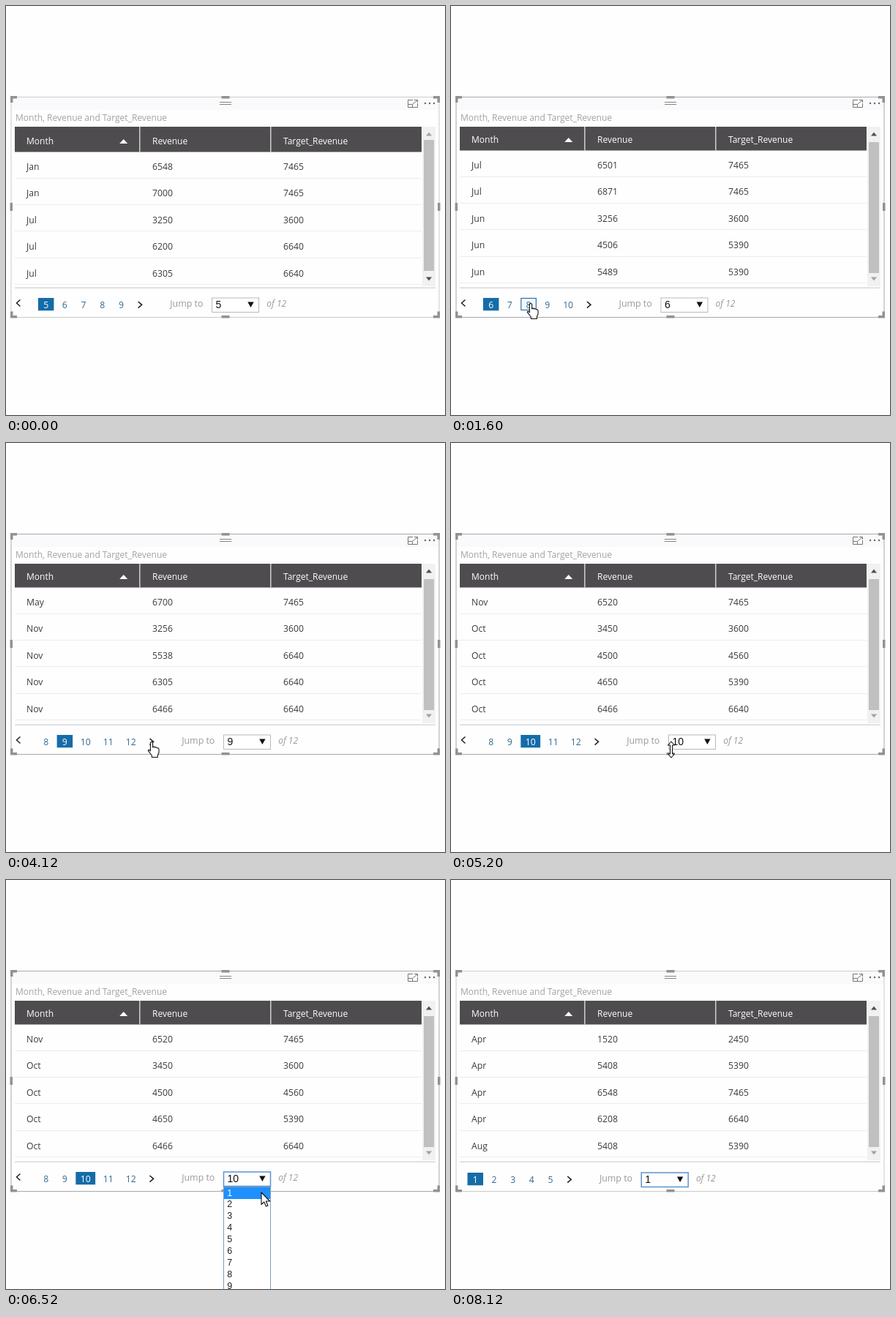
An HTML page that plays this animation: 600 px wide and 559 px high, repeating every 8.96 s.

```html
<!DOCTYPE html>
<html lang="en">
<head>
<meta charset="utf-8">
<title>Paged table</title>
<style>
html, body { margin: 0; width: 100%; height: 100%; overflow: hidden; background: #fefefe; }
svg { display: block; font-family: "Open Sans", "Noto Sans", sans-serif; }
.ui { font-family: "Liberation Sans", Arial, sans-serif; }
</style>
</head>
<body>
<svg id="stage" width="600" height="559" viewBox="0 0 600 559"></svg>
<script>
const LOOP = 8960, TICK = 40, STEP = 100;
const stage = document.getElementById('stage');

const pages = {
  5: ['Jan 6548 7465', 'Jan 7000 7465', 'Jul 3250 3600', 'Jul 6200 6640', 'Jul 6305 6640'],
  6: ['Jul 6501 7465', 'Jul 6871 7465', 'Jun 3256 3600', 'Jun 4506 5390', 'Jun 5489 5390'],
  9: ['May 6700 7465', 'Nov 3256 3600', 'Nov 5538 6640', 'Nov 6305 6640', 'Nov 6466 6640'],
  10: ['Nov 6520 7465', 'Oct 3450 3600', 'Oct 4500 4560', 'Oct 4650 5390', 'Oct 6466 6640'],
  1: ['Apr 1520 2450', 'Apr 5408 5390', 'Apr 6548 7465', 'Apr 6208 6640', 'Aug 5408 5390']
};
const clicks = [[0, 5], [1100, 6], [2900, 9], [4700, 10], [6800, 1]];

// pointer path: time, x, y
const path = [
  [100, 236, 416], [900, 185, 409], [1100, 185, 409], [1600, 109, 406], [2000, 132, 406],
  [2900, 132, 406], [3800, 197, 409], [4100, 199, 408], [4700, 199, 408], [5000, 265, 420],
  [5200, 301, 419], [5600, 349, 409], [5700, 349, 409], [6500, 349, 427], [7500, 349, 427],
  [7700, 346, 418], [8000, 340, 434], [8100, 340, 434]
];

const rect = (x, y, w, h, fill, more = '') =>
  `<rect x="${x}" y="${y}" width="${w}" height="${h}" fill="${fill}" ${more}/>`;
const line = (d, stroke, width = 1) =>
  `<path d="${d}" fill="none" stroke="${stroke}" stroke-width="${width}"/>`;
const shape = (d, fill, more = '') => `<path d="${d}" fill="${fill}" ${more}/>`;
const text = (x, y, str, fill, size = 12, more = '') =>
  `<text x="${x}" y="${y}" fill="${fill}" font-size="${size}" ${more}>${str}</text>`;

function pointerAt(t) {
  const i = path.findIndex(p => p[0] > t);
  if (i < 1) return null;
  const [t0, x0, y0] = path[i - 1], [t1, x1, y1] = path[i];
  const u = (t - t0) / (t1 - t0), e = u * u * (3 - 2 * u);
  return { x: x0 + (x1 - x0) * e, y: y0 + (y1 - y0) * e };
}

function drawFrame(active) {
  const grey = '#929292';
  const corner = (x, y, sx, sy) =>
    `<g transform="translate(${x} ${y}) scale(${sx} ${sy})">${shape('M0 0H9V3.5H3.5V9H0Z', grey)}</g>`;
  return rect(8, 126, 584, 16, '#faf9fb') +
    rect(7, 124.5, 585, 301, 'none', `stroke="${active ? '#a8a8a8' : '#cacaca'}"`) +
    corner(6, 123, 1, 1) + corner(593, 123, -1, 1) +
    corner(6, 426.5, 1, -1) + corner(593, 426.5, -1, -1) +
    rect(294.5, 123, 11, 3.5, grey) + rect(294.5, 423, 11, 3.5, grey) +
    rect(5.5, 269, 3.5, 11, grey) + rect(590, 269, 3.5, 11, grey) +
    line('M292 131.5H308M292 134.5H308', '#858585') +
    line('M556 128.5H549.5V138.5H562.5V133M558 128.5H562.5V132M562 129L556 134M549.5 134.5H555.5V138.5', '#777') +
    [573, 579, 585].map(x => `<circle cx="${x}" cy="133" r="1.2" fill="#666"/>`).join('') +
    text(13, 157, 'Month, Revenue and Target_Revenue', '#a3a2a3');
}

function drawTable(page) {
  const scroll = page === 5 ? 0 : 2;
  const cols = [28, 200, 379];
  let out = rect(12, 165, 556, 34.5 - scroll, '#4e4c4e') +
    line(`M182.8 165v${34.5 - scroll}M361.8 165v${34.5 - scroll}`, '#d8d8d8', 1.4) +
    ['Month', 'Revenue', 'Target_Revenue'].map((s, i) => text(cols[i], 188.5 - scroll, s, '#fff')).join('') +
    shape(`M160.7 ${182 - scroll}l5.5 6h-11Z`, '#fff');
  pages[page].forEach((row, r) => {
    const y = 219.5 - scroll + 36.4 * r;
    row.split(' ').forEach((s, i) => { out += text(cols[i], y + 4.5, s, '#3a3a3a', 12.2); });
    out += line(`M12 ${Math.round(y + 16) - .5}H568`, '#ececee');
  });
  const [up, down] = scroll ? ['#505050', '#a3a3a3'] : ['#a3a3a3', '#505050'];
  return out + rect(569, 165, 18, 218, '#f1f1f2') +
    rect(571, scroll ? 186 : 183, 14, 179, '#c1c0c1') +
    shape('M578 172.5l4 5h-8Z', up) + shape('M578 375.5l4-5h-8Z', down) +
    line('M12 385.3H587', '#d9d7dd', 1.4);
}

function pagerLayout(page) {
  const first = Math.min(page, 8), cells = [];
  let x = page === 1 ? 20.4 : 41.8;
  for (let n = first; n < first + 5; n++) {
    const w = n > 9 ? 31 : 25.7;
    cells.push({ n, cx: x + w / 2, w: w - 4.2 });
    x += w;
  }
  return { cells, end: x };
}

function drawPager(page, { cells, end }, focus, pointer) {
  const dy = page === 1 ? 1 : 0, sx = end + 111;
  let out = page > 1 ? line('M19.5 401.5L14.5 406L19.5 410.5', '#222', 1.5) : '';
  for (const { n, cx, w } of cells) {
    const on = n === page;
    const hover = !on && pointer && Math.abs(pointer.x - cx) < w / 2 && pointer.y < 417;
    if (on) out += rect(cx - w / 2, 399, w, 17.3, '#146ca8', `transform="translate(0 ${dy})"`);
    if (hover) out += rect(cx - w / 2 + .5, 399.5, w - 1, 16, '#f3f7fc', 'stroke="#2a74ad" stroke-width="1.2"');
    out += text(cx, 412.5 + dy, n, on ? '#fff' : '#33698f', 12.2, 'text-anchor="middle"');
  }
  return out +
    line(`M${end + 10.3} ${404 + dy}l5 4.3l-5 4.3`, '#222', 1.6) +
    text(end + 54, 411 + dy, 'Jump to', '#999', 12.4) +
    rect(sx + .3, 399 + dy, 64, 19.5, '#fff', focus ? 'stroke="#5a92d0" stroke-width="1.5"' : 'stroke="#b9b9b9"') +
    text(sx + 5.3, 413.2 + dy, page, '#111', 14, 'class="ui"') +
    shape(`M${sx + 49} ${404.5 + dy}h8.4l-4.2 7.5Z`, '#111') +
    text(end + 186, 411 + dy, 'of 12', '#999', 12, 'font-style="italic"');
}

function drawList(x, hover) {
  let out = rect(x + .3, 419.5, 64, 150, '#fff', 'stroke="#7f9db9"');
  if (hover) out += rect(x + .8, 420, 63, 16, '#1e90ff');
  for (let n = 1; n < 10; n++)
    out += text(x + 5, 431.5 + 15.9 * (n - 1), n, hover && n === 1 ? '#fff' : '#222', 12.5, 'class="ui"');
  return out;
}

function drawPointer({ x, y }, { cells, end }) {
  const buttons = [...cells, { cx: end + 13, w: 22 }];
  const overButton = y < 417 && buttons.some(b => Math.abs(x - b.cx) < b.w / 2 + 1);
  let d = 'M0 0V16.5L3.8 13L6.5 19L9 18L6.4 12H11.7Z';
  if (Math.abs(x - 301) < 7 && y > 416 && y < 428)
    d = 'M0-11L4.5-6H1.5V6H4.5L0 11L-4.5 6H-1.5V-6H-4.5Z';
  else if (overButton)
    d = 'M-1.6 1.7Q0-1 1.6 1.7V8Q3.2 6.2 4.6 8.2Q6.3 6.8 7.5 9Q9.6 8.2 10 10.5V15L8.3 18.8V21.5H.3V19L-4.6 12.7Q-4.6 10 -1.6 12.8Z';
  return `<g transform="translate(${x} ${y})">${shape(d, '#fff', 'stroke="#111" stroke-width="1.1" stroke-linejoin="round"')}</g>`;
}

function draw(ms) {
  const t = Math.floor(Math.floor(ms / TICK) * TICK / STEP) * STEP;
  const page = clicks.filter(c => c[0] <= t).pop()[1];
  const pointer = pointerAt(t), layout = pagerLayout(page);
  const open = t >= 5700 && t < 6800;
  stage.innerHTML =
    drawFrame(open || pointer && pointer.y < 426) +
    drawTable(page) +
    drawPager(page, layout, t >= 5700, pointer) +
    (open ? drawList(layout.end + 111, pointer.y > 419) : '') +
    (pointer ? drawPointer(pointer, layout) : '');
}

const start = performance.now();
function loop() {
  draw((performance.now() - start) % LOOP);
  requestAnimationFrame(loop);
}
loop();
</script>
</body>
</html>
```
